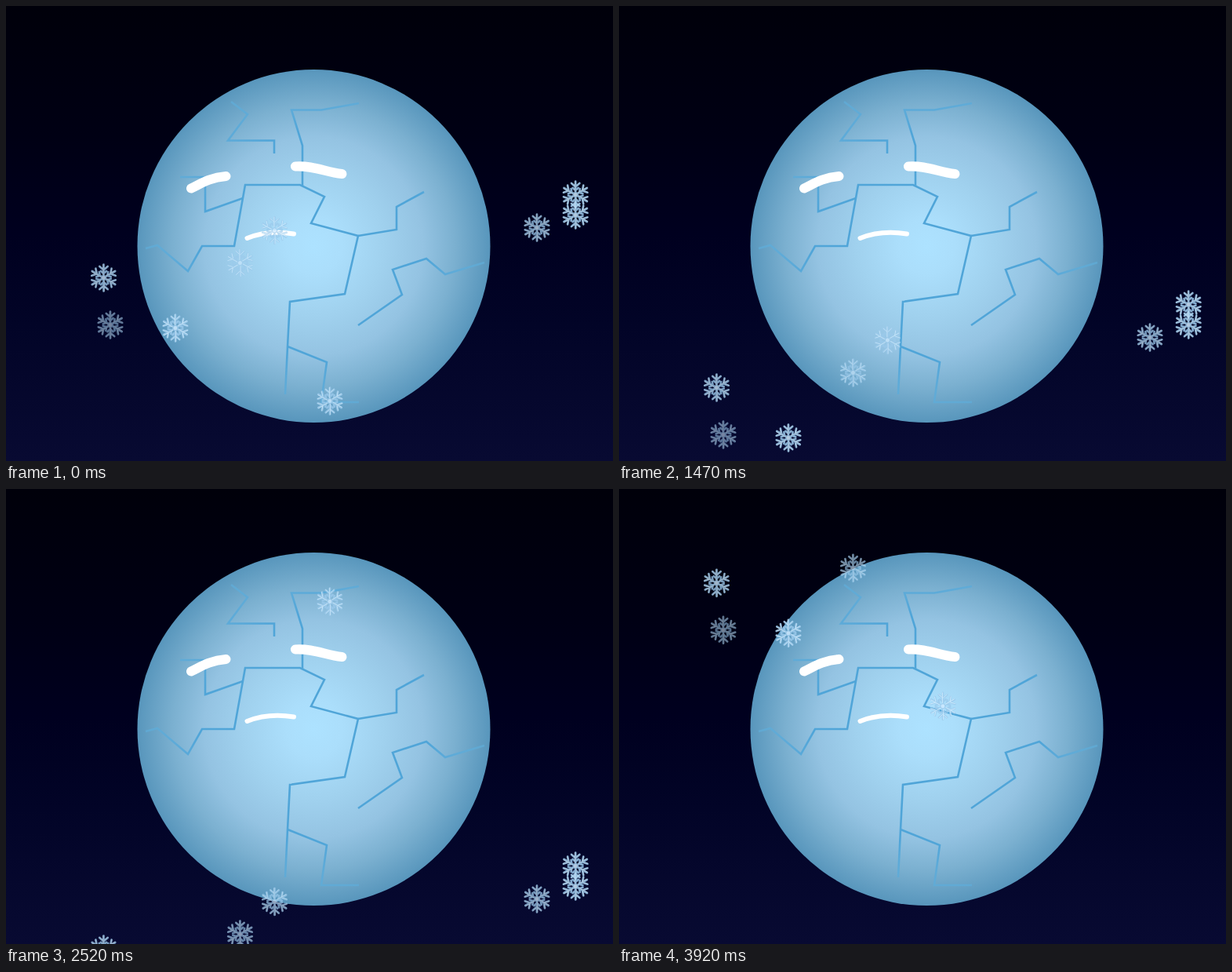
An HTML page for the animation above (3.99 s loop, 774x580 px).

```html
<!DOCTYPE html>
<html lang="en">
<head>
<meta charset="utf-8">
<title>Frozen planet</title>
<style>
  html, body { margin: 0; width: 100%; height: 100%; overflow: hidden; background: #00000c; }
  svg { display: block; width: 774px; height: 580px; }
</style>
</head>
<body>
<svg viewBox="0 0 774 580">
  <defs>
    <linearGradient id="sky" x1="0" y1="0" x2="0" y2="1">
      <stop offset="0" stop-color="#00000a"/>
      <stop offset=".29" stop-color="#000014"/>
      <stop offset=".5" stop-color="#00001f"/>
      <stop offset=".7" stop-color="#020427"/>
      <stop offset="1" stop-color="#080a32"/>
    </linearGradient>
    <radialGradient id="ice">
      <stop offset="0" stop-color="#ade2ff"/>
      <stop offset=".16" stop-color="#abdefb"/>
      <stop offset=".4" stop-color="#a0d1ee"/>
      <stop offset=".62" stop-color="#94c3e2"/>
      <stop offset=".8" stop-color="#7bb0d0"/>
      <stop offset="1" stop-color="#5896bc"/>
    </radialGradient>
    <radialGradient id="crack" gradientUnits="userSpaceOnUse" cx="392.5" cy="306" r="225">
      <stop offset=".65" stop-color="#50a5d8"/>
      <stop offset=".85" stop-color="#5aabda" stop-opacity=".75"/>
      <stop offset="1" stop-color="#62b2de" stop-opacity=".55"/>
    </radialGradient>
    <g id="arm">
      <path d="M0-3V-17M-5.2-14.6L0-10L5.2-14.6M-3.6-8.6L0-5.6L3.6-8.6" stroke="#9ccaec" stroke-width="2.7"/>
      <path d="M-.6-4V-17M-5.4-15L-.6-10.8M.6-10.8L5-15" stroke="#d6efff" stroke-width=".9"/>
    </g>
    <g id="flake" fill="none" stroke-linecap="round" stroke-linejoin="round">
      <use href="#arm"/>
      <use href="#arm" transform="rotate(60)"/>
      <use href="#arm" transform="rotate(120)"/>
      <use href="#arm" transform="rotate(180)"/>
      <use href="#arm" transform="rotate(240)"/>
      <use href="#arm" transform="rotate(300)"/>
      <circle r="3.1" fill="#cfeaff" stroke="#9ccaec" stroke-width="1"/>
    </g>
  </defs>

  <rect width="774" height="580" fill="url(#sky)"/>
  <circle cx="392.5" cy="306" r="225" fill="url(#ice)"/>

  <g fill="none" stroke="url(#crack)" stroke-width="2.6">
    <path d="M287 122L308 138L283 171.5H342V188"/>
    <path d="M450 124L402 132.5H364L378 178V229"/>
    <path d="M178 309L193 305L232 338L250 306H291L305 228H375L406 243L389 277L449 293L432 367L362 377L359 434L356 495"/>
    <path d="M359 434L409 454L402 505H450"/>
    <path d="M449 293L498 285V256L533 237"/>
    <path d="M449 407L505 368L493 336L536 322L560 342L610 327"/>
    <path d="M302 245L254 262V218H222"/>
  </g>

  <g fill="none" stroke="#fff" stroke-linecap="round">
    <path d="M236 232.5C248 227 258 219 280.5 217" stroke-width="12"/>
    <path d="M369 204.5C392 203 408 212 428.5 214" stroke-width="12"/>
    <path d="M307.5 296C325 289 345 287 367 290.5" stroke-width="6"/>
  </g>

  <g id="snow"></g>
</svg>
<script>
  const STEP = 70, STEPS = 57;
  const FALL = 20 / 3;              // pixels per step
  const SPAN = 600, TOP = 75.5;     // flakes re-enter at TOP

  // x, starting y, opacity
  const flakes = [
    [124.5, 346.5, .78],
    [133, 406.5, .55],
    [216, 410.5, .86],
    [298.5, 327.5, .64],
    [342.5, 286, .7],
    [413, 503.5, .8],
    [677, 282.5, .74],
    [726.2, 240.5, .86],
    [726.2, 266.5, .86]
  ];

  const snow = document.getElementById('snow');
  const nodes = flakes.map(([, , opacity]) => {
    const node = document.createElementNS('http://www.w3.org/2000/svg', 'use');
    node.setAttribute('href', '#flake');
    node.setAttribute('opacity', opacity);
    return snow.appendChild(node);
  });

  function draw(ms) {
    const step = Math.floor(ms / STEP) % STEPS;
    flakes.forEach(([x, y0], i) => {
      const y = TOP + (y0 + step * FALL - TOP) % SPAN;
      nodes[i].setAttribute('transform', `translate(${x} ${y.toFixed(2)})`);
    });
  }

  const start = performance.now();
  function tick() {
    draw(performance.now() - start);
    requestAnimationFrame(tick);
  }
  tick();
</script>
</body>
</html>
```
